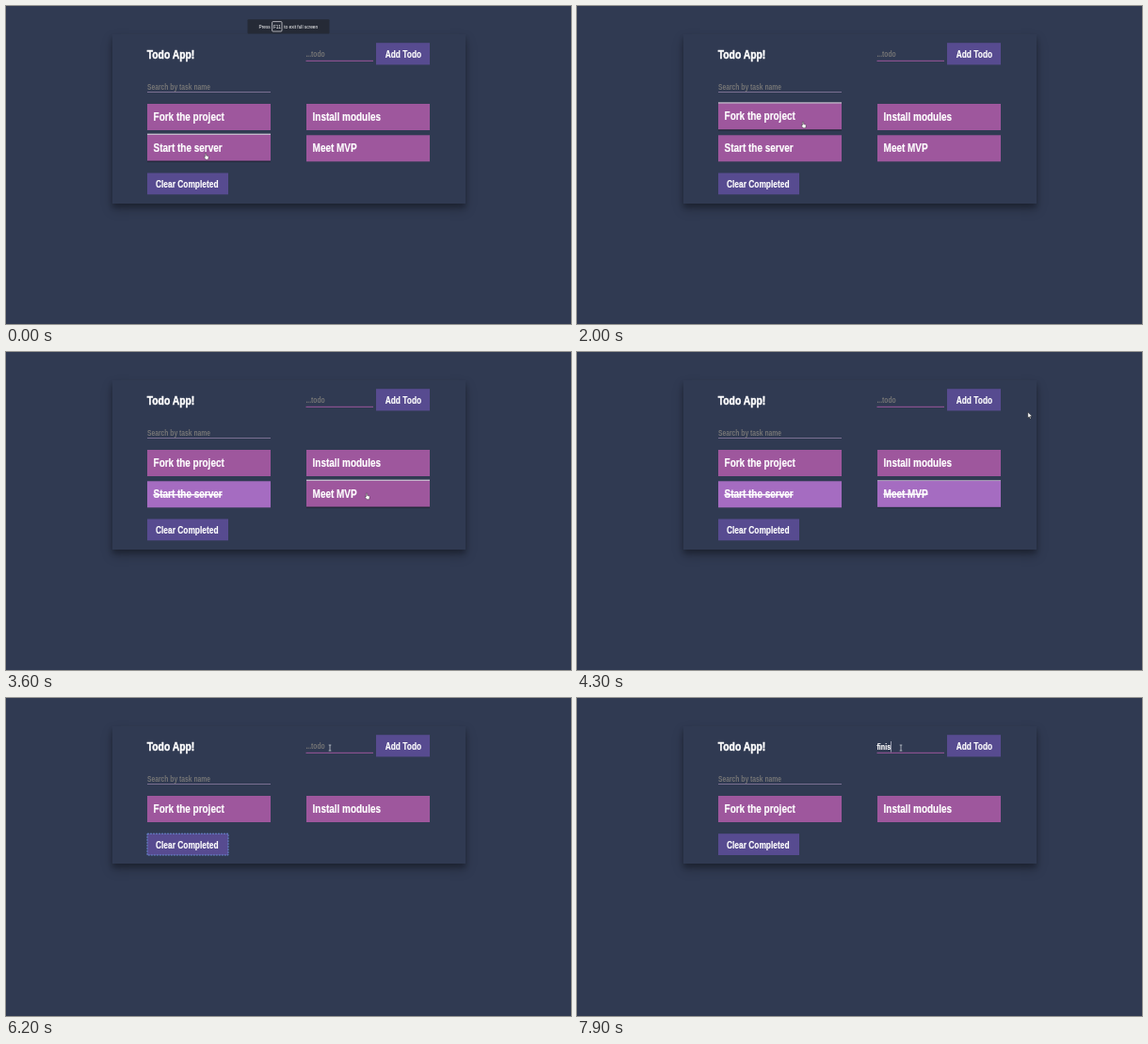
Recreate the animation shown at these times as an HTML page. Size 600x338 px, loop 8 s.

```html
<!DOCTYPE html>
<html lang="en">
<head>
<meta charset="utf-8">
<title>Todo App</title>
<style>
  html, body { margin: 0; width: 100%; height: 100%; overflow: hidden; background: #303a52; }
  #stage { position: absolute; left: 0; top: 0; width: 600px; height: 338px; overflow: hidden; background: #303a52; }
  #card {
    position: absolute; left: 112.5px; top: 30px; width: 375px; background: #303a52;
    box-shadow: 0 6px 11px rgba(0, 0, 0, .25), 0 4px 5px rgba(0, 0, 0, .22);
  }
  svg { position: absolute; left: 0; top: 0; }
  text { font-family: "Liberation Sans", Arial, sans-serif; fill: #fff; white-space: pre; }
  .face { font-weight: 700; stroke: #fff; stroke-width: .2px; }
  .title { font-size: 13.1px; stroke-width: .5px; }
  .task { font-size: 12.6px; }
  .button { font-size: 10.6px; }
  .hint { font-size: 8.55px; fill: #757575; stroke: none; }
  .typed { font-size: 9px; }
  .small { font-size: 4.8px; }
  .done .face { text-decoration: line-through; }
  .box { fill: #9e579d; }
  .done .box { fill: #a56cc1; }
  .btn { fill: #574b90; }
  .hot .btn { fill: #6254a2; }
</style>
</head>
<body>
<div id="stage">
  <div id="card"></div>
  <svg id="art" width="600" height="338" viewBox="0 0 600 338"></svg>
</div>
<script>
const LOOP = 8000, STEP = 100, NARROW = 0.79;
const art = document.getElementById('art');
const card = document.getElementById('card');

function add(parent, tag, attrs, content) {
  const node = document.createElementNS('http://www.w3.org/2000/svg', tag);
  for (const key in attrs) node.setAttribute(key, attrs[key]);
  if (content) node.textContent = content;
  parent.appendChild(node);
  return node;
}
const rect = (parent, x, y, width, height, attrs) =>
  add(parent, 'rect', { x, y, width, height, ...attrs });
// One condensed face for all page text
const label = (parent, x, y, style, content) =>
  add(parent, 'text', { class: 'face ' + style, transform: `translate(${x} ${y}) scale(${NARROW} 1)` }, content);
const show = (node, on) => node.setAttribute('opacity', +on);
const within = (t, from, to) => t >= from && t < to;

// Header and inputs
label(art, 149.7, 55.8, 'title', 'Todo App!');
rect(art, 318.5, 57.8, 71.5, 1, { fill: '#9e579d' });
rect(art, 150, 91, 131, 1, { fill: '#7a6f92' });
label(art, 150, 88.5, 'hint', 'Search by task name');
const hint = label(art, 318.5, 54.4, 'hint', '...todo');
const typed = label(art, 318.5, 54.6, 'typed', '');
const caret = rect(art, 0, 46, 0.6, 11.5, { fill: '#dde' });

const addButton = add(art, 'g');
rect(addButton, 393, 39.2, 57, 23.2, { class: 'btn' });
label(addButton, 402.7, 54.8, 'button', 'Add Todo');

const clearButton = add(art, 'g');
rect(clearButton, 150, 177.5, 86, 22.8, { class: 'btn' });
const outline = rect(clearButton, 150, 177.5, 86, 22.8,
  { fill: 'none', stroke: '#6f92de', 'stroke-width': 0.9, 'stroke-dasharray': '2 1' });
label(clearButton, 159, 192.8, 'button', 'Clear Completed');

// Tasks: place, hover spans, time of completion
const CLEARED = 5300;
const tasks = [
  { name: 'Fork the project', x: 150, y: 104, hover: [[1200, 1600], [1800, 2250]] },
  { name: 'Install modules', x: 319, y: 104, hover: [[950, 1150]] },
  { name: 'Start the server', x: 150, y: 137.3, hover: [[-500, 250], [2300, 2900], [4600, 4900]], done: 2600 },
  { name: 'Meet MVP', x: 319, y: 137.3, hover: [[500, 930], [3000, 4200]], done: 4100 }
];
for (const task of tasks) {
  const { x, y } = task;
  task.node = add(art, 'g');
  task.shade = rect(task.node, x, y + 27, 131, 2.4, { fill: '#000' });
  rect(task.node, x, y, 131, 28, { class: 'box' });
  task.edge = rect(task.node, x, y - 0.8, 131, 1.1, { fill: '#dcd3e2' });
  label(task.node, x + 6.6, y + 18.1, 'task', task.name);
}

// Full-screen notice
const notice = add(art, 'g');
rect(notice, 256.5, 14.3, 87, 15.2, { rx: 1, fill: '#252a36' });
rect(notice, 282.6, 16.6, 10.4, 10.4, { rx: 1, fill: 'none', stroke: '#e8e8ec', 'stroke-width': 0.7 });
for (const [x, words] of [[268.5, 'Press'], [283.9, 'F11'], [295.2, 'to exit full screen']])
  add(notice, 'text', { class: 'small', x, y: 23.5 }, words);

// Pointers
const pointer = add(art, 'g');
const outlined = { fill: '#fff', stroke: '#111', 'stroke-width': 0.4 };
const pointers = {
  hand: add(pointer, 'path', { ...outlined,
    d: 'M-.6 0a.6.6 0 0 1 1.2 0v2.1l2 .5q.8.3.6 1.2l-.5 2.4h-2.6l-1.7-2.5q-.2-.9.6-.6l.4.4z' }),
  arrow: add(pointer, 'path', { ...outlined, d: 'M0 0V6L1.4 4.7 2.4 7 3.3 6.6 2.4 4.4 4.3 4.3z' }),
  beam: add(pointer, 'path', { fill: 'none', stroke: '#d5d8e0', 'stroke-width': 0.7, d: 'M-1.3-3h2.6M0-3V3M-1.3 3h2.6' })
};

// Pointer stops: time, x, y
const path = [
  [0, 212, 157], [200, 214, 158], [400, 300, 170], [600, 360, 152], [800, 368, 140], [1000, 367.5, 124.5],
  [1300, 238, 121], [1500, 244, 122], [1800, 324, 147], [2000, 240, 123.5], [2200, 240, 123.5],
  [2500, 236, 149], [2700, 236, 149], [3000, 347, 146], [3600, 383, 150.5], [4100, 384, 150],
  [4400, 512, 34], [4700, 235, 150], [5000, 202.5, 186], [5350, 202, 187], [5700, 234, 160],
  [6000, 366, 54], [6200, 344, 53], [8000, 344, 53]
];
function pointerAt(t) {
  const i = path.findIndex(stop => stop[0] > t);
  const [t0, x0, y0] = path[i - 1], [t1, x1, y1] = path[i];
  const p = (t - t0) / (t1 - t0), e = p * p * (3 - 2 * p);
  return [x0 + (x1 - x0) * e, y0 + (y1 - y0) * e];
}

const clamp = v => Math.max(0, Math.min(1, v));
function liftAt(spans, t) {
  return Math.max(...spans.map(([from, to]) =>
    Math.min(clamp((t - from) / 150), clamp(1 - (t - to) / 250))));
}

function draw(t) {
  const cleared = t >= CLEARED, shift = cleared ? -33.3 : 0;
  card.style.height = 179.5 + shift + 'px';
  show(notice, clamp((700 - t) / 400));

  for (const task of tasks) {
    const lift = liftAt(task.hover, t);
    task.node.setAttribute('transform', `translate(0 ${-0.8 * lift})`);
    task.node.setAttribute('class', t >= task.done ? 'done' : '');
    show(task.node, !(cleared && task.done));
    show(task.edge, lift);
    show(task.shade, 0.3 * lift);
  }

  const [x, y] = pointerAt(t);
  const over = (l, top, w, h) => x >= l && x < l + w && y >= top && y < top + h;
  const overAdd = over(393, 39, 57, 23), overClear = over(150, 177.5 + shift, 86, 23);
  const overTask = tasks.some(k => !(cleared && k.done) && over(k.x, k.y, 131, 28));
  const kind = over(318, 45, 72, 14) ? 'beam' : overAdd || overClear || overTask ? 'hand' : 'arrow';
  pointer.setAttribute('transform', `translate(${x} ${y})`);
  for (const name in pointers) show(pointers[name], name === kind);

  addButton.setAttribute('class', overAdd ? 'hot' : '');
  clearButton.setAttribute('class', overClear ? 'hot' : '');
  clearButton.setAttribute('transform', `translate(0 ${shift})`);
  show(outline, within(t, CLEARED, 6400));

  const count = Math.max(0, Math.floor((t - 7400) / 100));
  typed.textContent = 'finis'.slice(0, count);
  show(hint, !count);
  caret.setAttribute('x', 318.5 + (count ? typed.getComputedTextLength() * NARROW + 0.2 : 0));
  show(caret, within(t, 6400, 6900) || t >= 7400);
}

const start = performance.now();
function tick() {
  const t = (performance.now() - start) % LOOP;
  draw(Math.floor(t / STEP) * STEP);
  requestAnimationFrame(tick);
}
tick();
</script>
</body>
</html>
```
